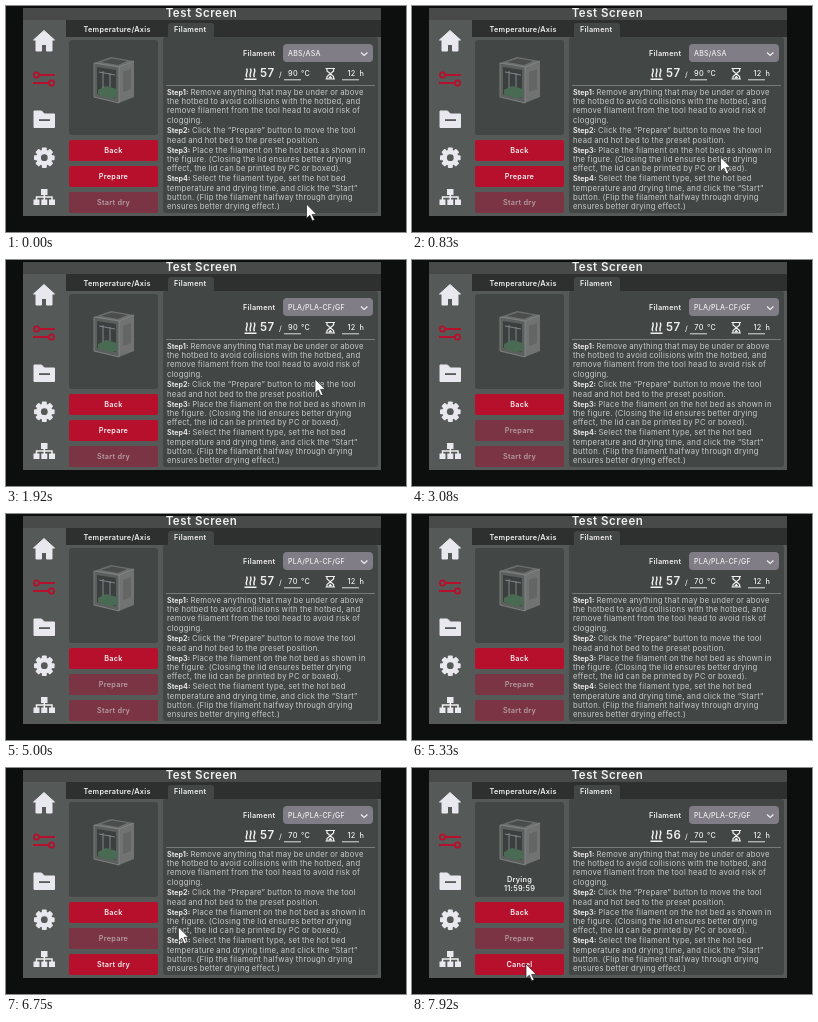
Animation, 400 px wide and 226 px high, one loop 8 s. Source, as an HTML page:

```html
<!DOCTYPE html>
<html lang="en">
<head>
<meta charset="utf-8">
<title>Filament drying</title>
<style>
html, body { margin: 0; width: 100%; height: 100%; overflow: hidden; background: #0c0f0e; }
svg { display: block; width: 100%; height: 100%; }
text { font: 500 7.3px Inter, "Open Sans", sans-serif; letter-spacing: .035em; fill: #f0f0f0; }
.mid { text-anchor: middle; }
.bold { font-weight: 600; }
.steps text { font-size: 7.7px; font-weight: 400; word-spacing: -.4px; fill: #c9cbca; }
.steps tspan { font-size: 7.2px; font-weight: 700; letter-spacing: 0; fill: #e6e6e6; }
.list text { font-size: 7px; }
.line { fill: none; stroke: #f0f0f0; stroke-width: 1.2; }
</style>
</head>
<body>
<svg id="stage" viewBox="0 0 400 226"></svg>
<script>
const RED = "#b7102d", DIM = "#7b3444", CARD = "#424644", FRAME = "#555957", ICON = "#e9e8ee";

const rect = (x, y, w, h, fill, r = 0, extra = "") =>
  `<rect x="${x}" y="${y}" width="${w}" height="${h}" fill="${fill}" rx="${r}" ${extra}/>`;
const text = (x, y, str, cls = "", extra = "") =>
  `<text x="${x}" y="${y}" class="${cls}" ${extra}>${str}</text>`;
const path = (d, fill, extra = "") => `<path d="${d}" fill="${fill}" ${extra}/>`;
const line = (d, extra = "") => `<path class="line" d="${d}" ${extra}/>`;
const button = (id, y, label) =>
  rect(63, y, 89, 21, RED, 2, `id="${id}"`) + text(107.5, y + 13.2, label, "mid bold", `id="${id}Label"`);

// Each step: first baseline, then its lines
const steps = [
  [89, "Remove anything that may be under or above",
    "the hotbed to avoid collisions with the hotbed, and",
    "remove filament from the tool head to avoid risk of", "clogging."],
  [127.3, "Click the “Prepare” button to move the tool", "head and hot bed to the preset position."],
  [147, "Place the filament on the hot bed as shown in",
    "the figure. (Closing the lid ensures better drying", "effect, the lid can be printed by PC or boxed)."],
  [175.4, "Select the filament type, set the hot bed",
    "temperature and drying time, and click the “Start”",
    "button. (Flip the filament halfway through drying", "ensures better drying effect.)"],
];
const stepText = steps.map(([y, ...lines], n) => lines.map((str, i) =>
  text(161, y + i * 9.2, (i ? "" : `<tspan>Step${n + 1}:</tspan> `) + str)).join("")).join("");

const materials = ["ABS/ASA", "PA/PA-GF/PA-CF", "PAHT-CF/GF", "PC", "PET-CF", "PETG/PETG-CF",
  "PLA/PLA-CF/GF", "PPS-CF", "PVA", "TPU"];

const gearTeeth = Array.from({ length: 8 }, (_, i) =>
  rect(-2.5, -10.3, 5, 5, ICON, 1, `transform="rotate(${i * 45})"`)).join("");

const sidebar =
  path("M38 24.5 27.5 34H30V45H35.5V38.5H40.5V45H46V34H48.5Z", ICON,
    `stroke="${ICON}" stroke-linejoin="round"`) +
  `<g fill="none" stroke="${RED}" stroke-width="1.8">` +
  path("M33.5 69H49M27 77H42.5", "none") +
  '<circle cx="30.5" cy="69" r="2.6"/><circle cx="45.5" cy="77" r="2.6"/></g>' +
  path("M28 105H35.5L38.5 108H48.5V121.5H28Z", ICON, `stroke="${ICON}" stroke-linejoin="round"`) +
  rect(33, 113.2, 11, 1.8, FRAME) +
  `<g transform="translate(38.3 151.7)">${gearTeeth}<circle r="8" fill="${ICON}"/><circle r="3.4" fill="${FRAME}"/></g>` +
  rect(35, 183, 6.5, 6, ICON) +
  [27.5, 35.3, 43].map(x => rect(x, 193.5, 6, 5.5, ICON)).join("") +
  line("M38.3 188V195M30.5 195V191H46V195", 'style="stroke-width:1.5"');

const printer =
  path("M88 57 105 51 128 55 113 61Z", "#6b6f6e") +
  path("M113 61 128 55V91L113 97Z", "#707372") +
  path("M88 57 113 61V97L88 91Z", "#5b5f5d") +
  path("M91 61 110 64V92L91 88Z", "#3b403e") +
  path("M92 84 100 80 111 83V91L103 92 92 88Z", "#4a6b53") +
  path("M93 66 109 69M97 65V82M104 67V81", "none", 'stroke="#80838a"') +
  path("M88 57 113 61V97L88 91ZM113 61 128 55", "none", 'stroke="#8a8d8c" stroke-width=".8"') +
  path("M95 56 106 52.5 121 55 112 59Z", "#4a4d4c") +
  path("M117 66 125 63V83L117 86Z", "#636665");

const wave = x => `M${x} 71.3Q${x - 1} 69 ${x} 67T${x} 62.5`;
const readings =
  line([240.7, 244.5, 248.3].map(wave).join("") + "M238.5 73.2H250.5", 'style="stroke-width:1.5"') +
  text(254, 71, "57", "bold", 'id="heat" style="font-size:11.5px"') + text(273, 71, "/") +
  text(287, 69.7, "90", "mid", 'id="goal"') + text(295, 70, "°C") +
  line("M278 73.8H295M336 73.8H353", 'style="stroke-width:.9"') +
  line("M319.5 62.5H329M319.5 73H329M321 63V65L324.3 67.8 327.6 65V63M321 73V70.6L324.3 67.8 327.6 70.6V73") +
  path("M322 72.5 324.3 69.5 326.6 72.5Z", "#f0f0f0") +
  text(345.5, 69.7, "12", "mid") + text(353.5, 70, "h");

const list = `<g id="list" class="list">${rect(277, 59, 90, 105, "#77747b", 3)}
  <g clip-path="url(#listClip)"><g id="rows">${rect(277, 61.5, 85, 15.5, RED)}
  ${materials.map((name, i) => text(286, 71.8 + i * 16.1, name)).join("")}</g></g>
  ${rect(363, 61, 2, 64, "#aaa8ae", 1, 'id="thumb"')}</g>`;

const dialog = `<g id="dialog">${rect(17, 2, 358, 208, "#03100b", 0, 'opacity=".5"')}
  ${rect(89, 46, 214, 120.5, "#414342", 5)}
  ${text(97, 85, "Ready, please check if the printer tool head has", "bold")}
  ${text(97, 94, "returned to the preset position before clicking", "bold")}
  ${text(97, 103, "start.", "bold")}
  ${rect(99, 135.3, 194, .8, "#858886")}
  ${rect(99, 140, 194, 23.5, "#4d504e", 5)}
  ${text(195.5, 154.5, "OK", "mid bold")}</g>`;

stage.innerHTML = `<defs>
  <clipPath id="screenClip">${rect(17, 2, 358, 208)}</clipPath>
  <clipPath id="listClip">${rect(277, 59, 90, 105, "#fff", 3)}</clipPath></defs>
  <g clip-path="url(#screenClip)">
  ${rect(17, 2, 358, 208, FRAME)}
  ${rect(60, 14, 315, 17, "#2d302e")}
  ${rect(17, 2, 358, 12, "#484a49")}
  ${text(195.5, 10.8, "Test Screen", "mid bold", 'style="font-size:11.5px;letter-spacing:.53px"')}
  ${sidebar}
  ${text(77.5, 26, "Temperature/Axis", "bold")}
  ${rect(162, 17, 46, 18, CARD, 3)}${rect(157, 31, 215, 176, CARD, 3)}
  ${text(168, 26, "Filament", "bold")}
  ${rect(63, 34, 89, 95, CARD, 3)}${printer}
  <g id="drying">${text(107.5, 114, "Drying", "mid bold")}${text(107.5, 122.5, "", "mid bold", 'id="clock"')}</g>
  ${button("back", 134, "Back")}${button("prepare", 160, "Prepare")}${button("start", 186, "Start dry")}
  ${text(237, 50, "Filament", "bold")}
  ${rect(277, 38, 90, 18, "#817d86", 4)}
  ${text(282, 49.8, "", "", 'id="material" style="font-size:7px"')}
  ${line("M355 46.5 358.2 49.5 361.4 46.5")}
  ${readings}
  ${rect(160, 79.2, 209, .8, "#858886")}
  <g class="steps">${stepText}</g>
  ${list}${dialog}</g>
  ${path("M0 0V14.2L3.3 11.2 5.8 16.8 8.1 15.8 5.6 10.4H10.2Z", "#fff",
    'id="cursor" stroke="#222" stroke-width=".7"')}`;

const part = id => document.getElementById(id);
const show = (id, on) => part(id).setAttribute("display", on ? "inline" : "none");
const say = (id, str) => { part(id).textContent = str; };
const enable = (id, on) => {
  part(id).setAttribute("fill", on ? RED : DIM);
  part(id + "Label").style.fill = on ? "#f0f0f0" : "#b39ba1";
};
const ease = p => p * p * (3 - 2 * p);
const progress = (t, from, to) => ease(Math.min(1, Math.max(0, (t - from) / (to - from))));

// Cursor stops: time, x, y
const stops = [[0, 300.5, 198], [500, 300.5, 198], [1160, 325.5, 52], [1330, 325.5, 52], [1750, 309, 119],
  [2090, 309, 119], [2830, 113, 170], [5250, 372, 218], [5990, 185, 151], [6600, 185, 151],
  [7160, 114, 196], [8000, 114, 196]];

function cursorAt(t) {
  const i = stops.findIndex(s => s[0] > t);
  const [t0, x0, y0] = stops[i - 1], [t1, x1, y1] = stops[i];
  const p = progress(t, t0, t1);
  return [x0 + (x1 - x0) * p, y0 + (y1 - y0) * p];
}

function render(now) {
  const t = Math.floor((now % 8000 + 1) * .012) % 96 / .012;
  const chosen = t > 1820, prepared = t > 2900, ready = t > 5320, drying = t > 7400, ticked = t > 7820;
  const scroll = 46 * progress(t, 1330, 1660);

  show("list", t > 1150 && !chosen);
  part("rows").setAttribute("transform", `translate(0 ${-scroll})`);
  part("thumb").setAttribute("y", 61 + scroll * .62);
  say("material", chosen ? "PLA/PLA-CF/GF" : "ABS/ASA");
  say("goal", t > 1990 ? "70" : "90");
  say("heat", ticked ? "56" : "57");

  enable("prepare", !prepared);
  enable("start", ready);
  say("startLabel", drying ? "Cancel" : "Start dry");
  show("drying", drying);
  say("clock", ticked ? "11:59:59" : "12:00:00");
  show("dialog", ready && t < 6410);

  show("cursor", t < 2990 || ready);
  part("cursor").setAttribute("transform", `translate(${cursorAt(t)})`);
}

function loop() {
  render(performance.now());
  requestAnimationFrame(loop);
}
loop();
</script>
</body>
</html>
```
